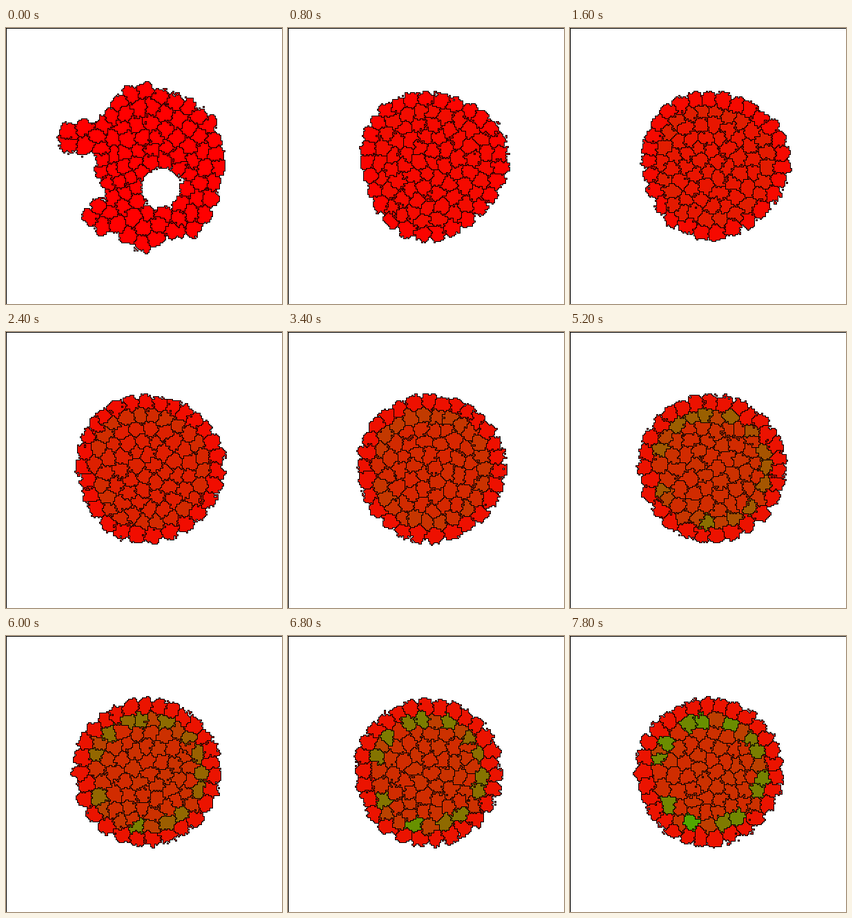
These frames come from a looping animation (400x400 px, 8 s). An HTML page with a canvas:

```html
<!DOCTYPE html>
<html lang="en">
<head>
<meta charset="utf-8">
<title>Cell aggregate</title>
<style>
  html, body { margin: 0; width: 100%; height: 100%; overflow: hidden; background: #fff; }
  canvas { display: block; width: 100vw; height: 100vh; image-rendering: pixelated; }
</style>
</head>
<body>
<canvas id="stage" width="400" height="400"></canvas>
<script>
const SIZE = 400, GRID = 200, STEPS = 40, STEP_MS = 200, CELLS = 90;
const TAU = Math.PI * 2, ROUNDING_STEPS = 4;

// The tissue starts as this ragged shape with a round hole
const RAGGED = [
  [69, 160], [88, 138], [140, 131], [170, 90], [200, 79], [270, 107], [301, 128],
  [317, 190], [306, 250], [284, 301], [235, 305], [203, 328], [160, 301], [130, 298],
  [108, 270], [128, 251], [149, 247], [134, 212], [131, 185], [84, 178]
];
const HOLE = { x: 225, y: 231, r: 31 };

// Differentiating cells: angle in degrees on a ring, when first pinned and at the end
const MARK_FROM = 26, MARK_START = 21, STRONGEST = 0;
const MARKED = [
  [96, 112], [67, 74], [45, 58], [17, 21], [-1, 7], [-17, -24], [-41, -38],
  [-70, -66], [-96, -98], [-110, -112], [-127, -147], [-159, -163], [157, 140]
];

const lerp = (a, b, u) => a + (b - a) * u;
const clamp = u => Math.max(0, Math.min(1, u));

function hash(x, y, z) {
  let h = Math.imul(x + 101, 374761393) ^ Math.imul(y + 57, 668265263) ^ Math.imul(z + 13, 1274126177);
  h = Math.imul(h ^ (h >>> 13), 1103515245);
  h = Math.imul(h ^ (h >>> 16), 2246822519);
  return ((h ^ (h >>> 14)) >>> 0) / 4294967296;
}

function noise(x, y, seed) {
  const i = Math.floor(x), j = Math.floor(y), u = x - i, v = y - j;
  return lerp(
    lerp(hash(i, j, seed), hash(i + 1, j, seed), u),
    lerp(hash(i, j + 1, seed), hash(i + 1, j + 1, seed), u), v) - 0.5;
}

// The rounded tissue drifts slowly to the left
const center = s => ({ x: lerp(212, 202, s / STEPS), y: 198 });

// All depths are distances to the edge, positive inside
function raggedDepth(x, y) {
  let min = Infinity, inside = false;
  RAGGED.forEach(([ax, ay], i) => {
    const [bx, by] = RAGGED[(i + 1) % RAGGED.length];
    const ex = bx - ax, ey = by - ay;
    const u = clamp(((x - ax) * ex + (y - ay) * ey) / (ex * ex + ey * ey));
    min = Math.min(min, Math.hypot(x - ax - u * ex, y - ay - u * ey));
    if ((ay > y) !== (by > y) && x < ax + ex * (y - ay) / ey) inside = !inside;
  });
  const hole = Math.hypot(x - HOLE.x, y - HOLE.y) - HOLE.r;
  return Math.min(inside ? min : -min, hole);
}

// Circle with three soft corners that fade away
function roundDepth(x, y, s) {
  const c = center(s), dx = x - c.x, dy = y - c.y;
  const corners = 9 * Math.exp(-s / 9) * Math.cos(3 * (Math.atan2(dy, dx) - 0.625 * TAU));
  return 105.5 + corners - Math.hypot(dx, dy);
}

function depth(x, y, s) {
  const u = s / ROUNDING_STEPS;
  if (u >= 1) return roundDepth(x, y, s);
  return lerp(raggedDepth(x, y), roundDepth(x, y, s), u);
}

function nearest(cells, x, y) {
  let best = 0, min = Infinity;
  for (let i = 0; i < cells.length; i++) {
    const dx = x - cells[i].x, dy = y - cells[i].y, d = dx * dx + dy * dy;
    if (d < min) { min = d; best = i; }
  }
  return [best, min];
}

function markPoint(i, s) {
  const u = clamp((s - MARK_FROM) / (STEPS - 1 - MARK_FROM)), c = center(s);
  const a = lerp(...MARKED[i], u) * TAU / 360, r = lerp(79, 75, u);
  return { x: c.x + r * Math.cos(a), y: c.y + r * Math.sin(a) };
}

function pin(cells, s) {
  if (s >= MARK_START) MARKED.forEach((m, i) => { cells[i] = markPoint(i, s); });
}

// Spread the cells evenly over the tissue
function relax(cells, s, rounds) {
  const inside = [];
  for (let y = 62; y < 340; y += 4)
    for (let x = 62; x < 340; x += 4)
      if (depth(x, y, s) > 0) inside.push([x, y]);
  for (let r = 0; r < rounds; r++) {
    pin(cells, s);
    const sums = cells.map(() => [0, 0, 0]);
    for (const [x, y] of inside) {
      const sum = sums[nearest(cells, x, y)[0]];
      sum[0] += x; sum[1] += y; sum[2]++;
    }
    cells.forEach((c, i) => {
      const [x, y, n] = sums[i];
      if (n) { c.x = x / n; c.y = y / n; }
    });
  }
  pin(cells, s);
  return cells;
}

function advance(cells, s) {
  const moved = cells.map((c, i) => ({
    x: c.x + (hash(i, s, 1) - 0.5) * 5,
    y: c.y + (hash(i, s, 2) - 0.5) * 5
  }));
  return relax(moved, s, s < ROUNDING_STEPS ? 25 : 2);
}

// Settle one middle pose, then work outwards in both directions
function buildPoses() {
  const poses = [], start = MARKED.map((m, i) => markPoint(i, MARK_FROM));
  const free = CELLS - MARKED.length, c = center(MARK_FROM);
  for (let i = 0; i < free; i++) {
    const r = 102 * Math.sqrt((i + 0.5) / free), a = i * 2.39996;
    start.push({ x: c.x + r * Math.cos(a), y: c.y + r * Math.sin(a) });
  }
  poses[MARK_FROM] = relax(start, MARK_FROM, 40);
  for (let s = MARK_FROM - 1; s >= 0; s--) poses[s] = advance(poses[s + 1], s);
  for (let s = MARK_FROM + 1; s < STEPS; s++) poses[s] = advance(poses[s - 1], s);
  return poses;
}

// Cells shift from red to green, least at the rim
function cellColor(c, i, s) {
  const d = depth(c.x, c.y, s), grown = 1 - Math.exp(-Math.pow(s / 11, 1.5));
  const vary = spread => 1 + spread * (hash(i, 7, 7) - 0.5);
  let v;
  if (i < MARKED.length && s >= MARK_START) v = 3.5 * s * (i === STRONGEST ? 1.28 : vary(0.25));
  else if (d < 17) v = 20 * grown;
  else if (d < 33) v = 62 * grown * vary(0.4);
  else v = 49 * grown * vary(0.2);
  return [255 - v, v * 0.95, 0];
}

const ctx = document.getElementById("stage").getContext("2d");
const image = ctx.createImageData(SIZE, SIZE);
const labels = new Int16Array((GRID + 1) * (GRID + 1));
const poses = buildPoses();
const WHITE = [255, 255, 255], BLACK = [0, 0, 0];

// Index of the cell that owns a lattice site, or -1 for the medium
function label(i, j, cells, s) {
  const x = 2 * i + 1, y = 2 * j + 1;
  if (Math.hypot(x - 200, y - 200) > 150) return -1;
  const wobble = seed =>
    7 * noise(i / 2.6, j / 2.6, s + seed) + 3.5 * (hash(i, j, s + seed + 200) - 0.5);
  const wx = x + wobble(0), wy = y + wobble(50);
  const d = depth(lerp(x, wx, 0.5), lerp(y, wy, 0.5), s);
  if (d < -3) return -1;
  const [cell, dist] = nearest(cells, wx, wy);
  return d > 4 || dist < 150 ? cell : -1;
}

function put(x, y, c) {
  const p = 4 * (y * SIZE + x);
  image.data[p] = c[0];
  image.data[p + 1] = c[1];
  image.data[p + 2] = c[2];
  image.data[p + 3] = 255;
}

function draw(s) {
  const cells = poses[s], w = GRID + 1;
  const colors = cells.map((c, i) => cellColor(c, i, s));
  for (let j = 0; j < w; j++)
    for (let i = 0; i < w; i++) labels[j * w + i] = label(i, j, cells, s);

  for (let j = 0; j < GRID; j++)
    for (let i = 0; i < GRID; i++) {
      const p = j * w + i, a = labels[p], right = labels[p + 1];
      const below = labels[p + w], diag = labels[p + w + 1];
      const fill = a < 0 ? WHITE : colors[a], x = 2 * i, y = 2 * j;
      put(x, y, fill);
      put(x + 1, y, a !== right ? BLACK : fill);
      put(x, y + 1, a !== below ? BLACK : fill);
      put(x + 1, y + 1, a !== diag || right !== below ? BLACK : fill);
    }
  for (let k = 0; k < SIZE; k++) { put(k, 0, BLACK); put(0, k, BLACK); }
  ctx.putImageData(image, 0, 0);
}

let shown = -1;
const began = performance.now();
function tick() {
  const s = Math.floor((performance.now() - began) / STEP_MS) % STEPS;
  if (s !== shown) draw(shown = s);
  requestAnimationFrame(tick);
}
tick();
</script>
</body>
</html>
```
